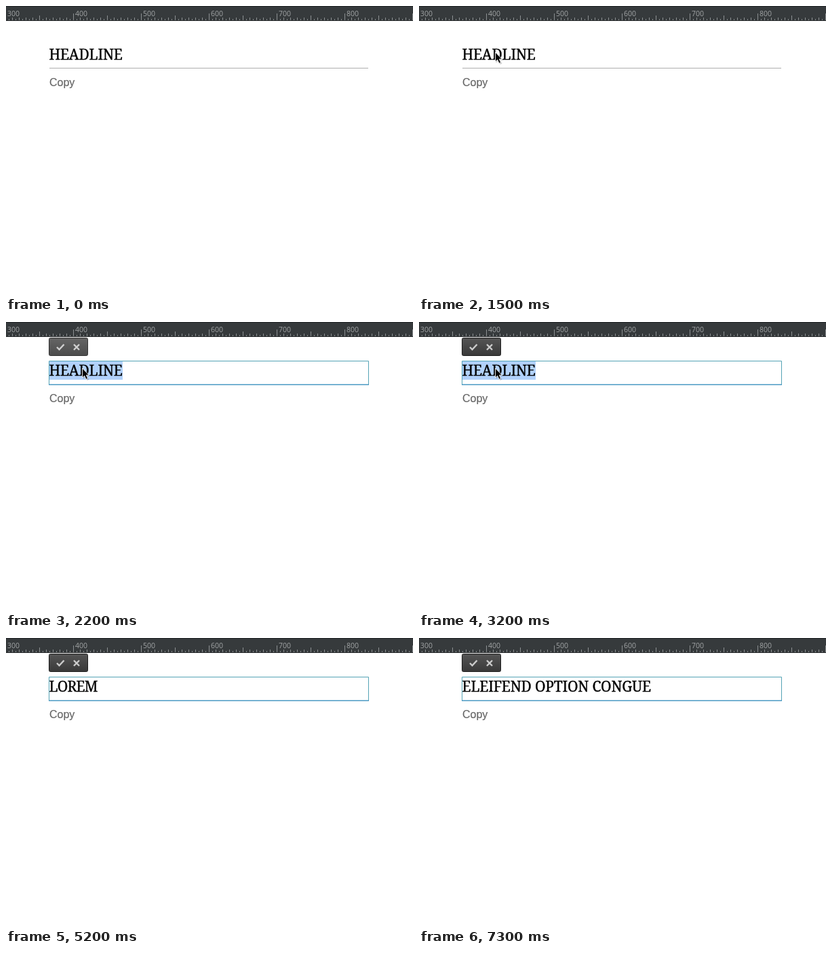
Recreate the animation shown at these times as an HTML page. Size 600 by 424 pixels, loop 8 s.

```html
<!DOCTYPE html>
<html lang="en">
<head>
<meta charset="utf-8">
<title>Inline headline editing</title>
<style>
html, body { margin: 0; width: 100%; height: 100%; overflow: hidden; background: #fff; }
svg { display: block; }
.scale { font: 10.5px "Open Sans", sans-serif; fill: #a2a5a6; }
.headline { font: 21px "Noto Serif", serif; fill: #000; stroke: #000; stroke-width: .35px; white-space: pre; }
.copy { font: 16px "Liberation Sans", Arial, sans-serif; fill: #666; stroke: #666; stroke-width: .2px; }
.tag { font: 8px "DejaVu Sans", sans-serif; fill: #111; }
</style>
</head>
<body>
<svg width="600" height="424" viewBox="0 0 600 424">
  <defs>
    <linearGradient id="bar" x2="0" y2="1">
      <stop stop-color="#555"/><stop offset="1" stop-color="#393939"/>
    </linearGradient>
    <path id="arrow" d="M0-1.2H3.5V-4L7.5 0L3.5 4V1.2H0Z" fill="#b9bdbf"/>
  </defs>
  <rect width="600" height="424" fill="#fff"/>

  <g id="hover">
    <path d="M0 22H534V57H63V92H0Z" fill="#e3f6fe"/>
    <g id="tags"></g>
  </g>

  <path id="rule" d="M64 91.5H534" stroke="#adadad"/>
  <rect id="selection" x="64" y="58" width="108" height="27" fill="#b1d1fb"/>
  <g id="frame" fill="none">
    <path d="M63.5 92V57.5H534.5V92" stroke="#55a3b5"/>
    <path d="M63 92.2H535" stroke="#4c9ac3" stroke-width="1.6"/>
  </g>
  <g id="handles" fill="#fff" stroke="#4c9ac3">
    <path d="M63.5 72L66.5 75L63.5 78L60.5 75Z"/>
    <path d="M534 72L537 75L534 78L531 75Z"/>
  </g>

  <text id="headline" class="headline" x="63.5" y="79"></text>
  <path id="caret" d="M0 58V85" stroke="#000"/>
  <text class="copy" x="64" y="118">Copy</text>

  <g id="toolbar">
    <rect x="63.5" y="23.5" width="57" height="26" rx="2" fill="url(#bar)" stroke="#1d1d1d"/>
    <g fill="none" stroke="#ccc" stroke-width="2.4">
      <path d="M75 37L78.5 40.5L85.5 33"/>
      <path d="M100 33L108 41M108 33L100 41"/>
    </g>
  </g>

  <g id="ruler">
    <rect width="600" height="22" fill="#363a3c"/>
    <path d="M0 .5H600M0 21.5H600" stroke="#222527"/>
  </g>

  <g id="mouse">
    <path d="M1 2V16L4.5 13L7 18L10 17L7.8 12H12Z" fill="#000" opacity=".18"/>
    <path d="M0 0V14L3.2 11.2L5.5 16.4L8.1 15.2L5.9 10.2H10Z" fill="#000" stroke="#fff" stroke-width=".9"/>
  </g>
</svg>
<script>
const DURATION = 8000;
const HOVER = 1900, EDIT = 2200, TYPE = 4000, PASTE = 6800;
const el = id => document.getElementById(id);

// Typed states: start time, text, caret position
const typed = [
  [4000, "L", 75.5],
  [4300, "LO", 91.5],
  [4400, "LOR", 104.5],
  [4500, "LORE", 118.5],
  [4700, "LOREM", 137.5],
  [5900, "LOREM I", 148.5],
  [6300, "LOREM IPS", 170.5]
];

function buildRuler() {
  let ticks = "", labels = "";
  for (let x = -1; x <= 600; x += 5) {
    const unit = x + 1;
    const top = unit % 100 === 0 ? 11 : unit % 50 === 0 ? 14 : unit % 10 === 0 ? 17 : 19;
    ticks += `M${x + .5} ${top}V21`;
    if (unit % 100 === 0) labels += `<text class="scale" x="${x + 3}" y="15">${300 + unit}</text>`;
  }
  el("ruler").innerHTML += `<path d="${ticks}" stroke="#8b8f91"/>${labels}`;
}

function tag(x, y, label, angle) {
  return `<g transform="translate(${x} ${y})">
    <rect width="53" height="21" fill="#fff"/>
    <path d="M0 21.5H53" stroke="#bfcdd3"/>
    <use href="#arrow" transform="translate(7.5 10.5) rotate(${angle}) translate(-3.5 0)"/>
    <text class="tag" x="14" y="13">${label}</text>
  </g>`;
}

function show(id, visible) {
  el(id).style.display = visible ? "" : "none";
}

function setHeadline(text, spacing) {
  el("headline").textContent = text;
  el("headline").style.letterSpacing = spacing + "px";
}

function render(t) {
  const hovering = t >= HOVER && t < EDIT;
  const editing = t >= EDIT;
  const typing = t >= TYPE && t < PASTE;

  show("hover", hovering);
  show("handles", hovering);
  show("rule", t < HOVER);
  show("frame", t >= HOVER);
  show("selection", editing && t < TYPE);
  show("toolbar", editing);
  el("toolbar").setAttribute("opacity", Math.min(1, .9 + Math.floor((t - EDIT) / 100) * .05));

  show("mouse", t >= 300 && t < TYPE);
  const p = Math.min(1, Math.max(0, Math.floor((t - 300) / 100) / 8));
  const eased = p * p * (3 - 2 * p);
  el("mouse").setAttribute("transform", `translate(${587 - 474.5 * eased} ${125 - 57 * eased})`);

  const state = typed.filter(s => s[0] <= t).pop();
  if (typing) {
    setHeadline(state[1], -.8);
    el("caret").setAttribute("transform", `translate(${state[2]})`);
  } else {
    setHeadline(t < TYPE ? "HEADLINE" : "ELEIFEND OPTION CONGUE", -.2);
  }
  // The caret stays lit for half a second after each key, then blinks
  show("caret", typing && Math.floor((t - state[0]) / 500) % 2 === 0);
}

buildRuler();
el("tags").innerHTML = tag(273, 32, "36px", 90) + tag(6, 65, "365px", 0);

const start = performance.now();
function tick() {
  render((performance.now() - start) % DURATION);
  requestAnimationFrame(tick);
}
tick();
</script>
</body>
</html>
```
